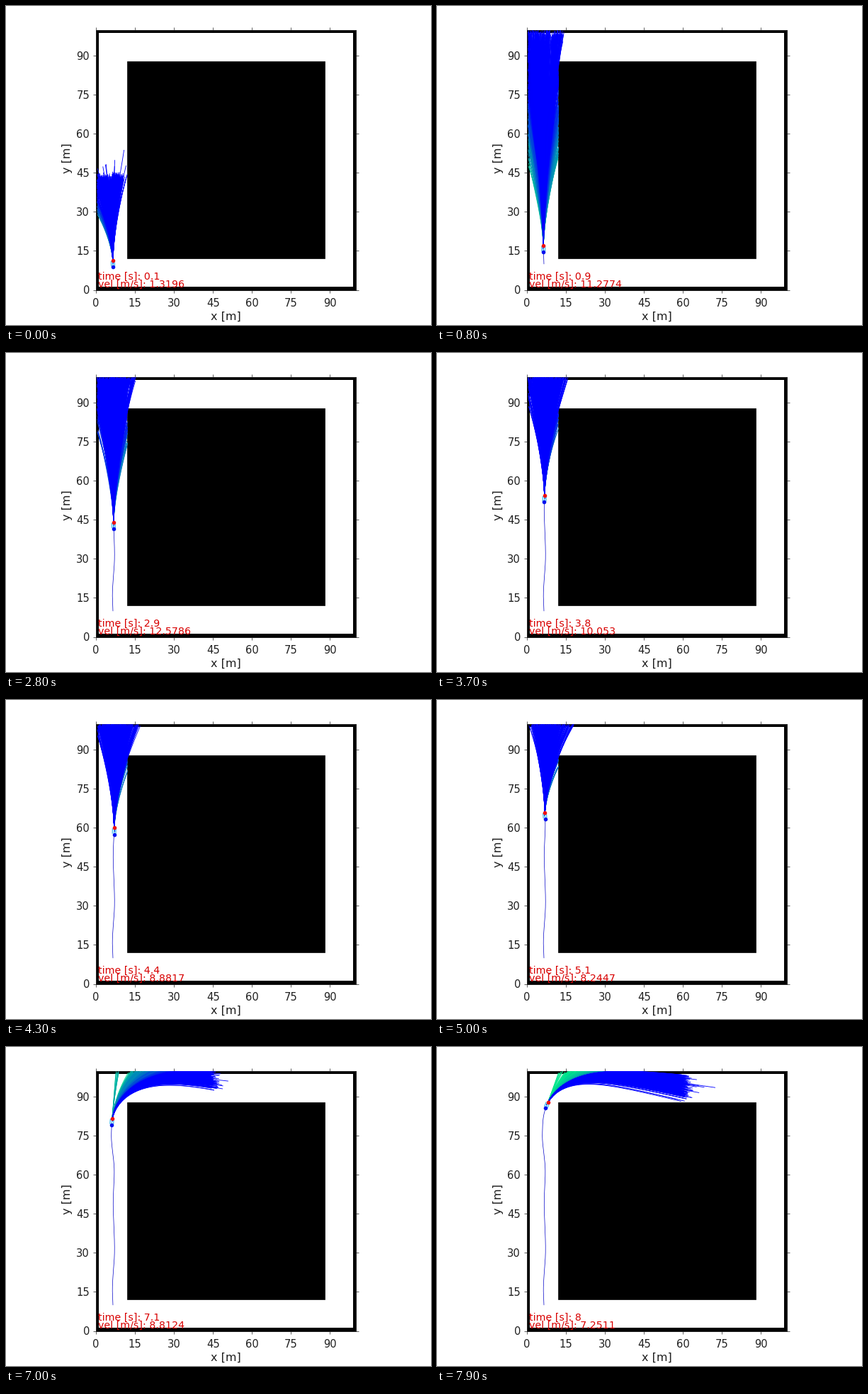
Recreate the animation shown at these times as a matplotlib script. Size 600 by 450 pixels, loop 8000 ms.

```python
import numpy as np
import matplotlib.pyplot as plt
from matplotlib.animation import FuncAnimation
from matplotlib.collections import LineCollection
from matplotlib.patches import Rectangle

W, H, DPI = 600, 450, 100
FRAMES, INTERVAL = 80, 100
PX = 72 / DPI                      # one pixel in points
LEFT, BOTTOM, SIDE = 127.125, 49.5, 366.75
INK = "0.12"
PLANS, STEPS = 600, 44
TURN_START = 6.4                   # seconds until the plans bend right

plt.rcParams.update({"font.family": "DejaVu Sans", "font.size": 14.3 * PX})


def hermite(x, xs, ys, slopes):
    """Cubic Hermite curve through the knots; returns value and slope."""
    k = np.clip(np.searchsorted(xs, x, side="right") - 1, 0, len(xs) - 2)
    h = xs[k + 1] - xs[k]
    u = (x - xs[k]) / h
    d = (ys[k + 1] - ys[k]) / h
    m0, m1 = slopes[k], slopes[k + 1]
    c2, c3 = 3 * d - 2 * m0 - m1, m0 + m1 - 2 * d
    value = ys[k] + h * u * (m0 + u * (c2 + u * c3))
    return value, m0 + u * (2 * c2 + 3 * u * c3)


# Key moments: time, y and speed
DRIVE = np.array([(0.1, 10.1, 1.3196), (0.9, 15.8, 11.2774),
                  (2.0, 30.7, 14.2992), (3.8, 53.1, 10.053),
                  (5.1, 64.7, 8.2447), (7.1, 80.5, 8.8124),
                  (8.0, 86.9, 7.2511)]).T

# Key points of the driven path
PATH_X, PATH_Y = np.array([(6.5, 10), (6.3, 15), (7.1, 30), (6.6, 50),
                           (7, 62), (5.9, 76), (6.65, 84), (8.4, 89)]).T
PATH_SLOPE = np.gradient(PATH_X, PATH_Y)


def path(y):
    return hermite(y, PATH_Y, PATH_X, PATH_SLOPE)


def straight_plans(rng, t, s):
    """Plans fanning out up the corridor, opening to the right with time."""
    a = np.clip(rng.normal(0, 0.38, (PLANS, 1)), -1, 1)
    left = 5.2 + 11 * np.exp(-3.5 * t)
    right = 5 + t ** 4 / 75
    wave = rng.normal(0, 0.2, (PLANS, 1)) * np.sin(s / 9) * s / 30
    return a * np.where(a < 0, left, right) * (s / 32.7) ** 1.7 + wave, s


def turning_plans(rng, t, s, heading):
    """Plans bending right around the corner."""
    q = rng.gamma(3, 0.22, (PLANS, 1))
    radius = (80 - 24 * (t - 7) + 45 * q) / 3.667
    end = np.radians(104 - 15 * np.minimum(q, 2))
    stray = rng.random((PLANS, 1)) < 0.015
    end = np.where(stray, heading + rng.uniform(-0.1, 0.25, q.shape), end)
    phi = heading + (end - heading) * np.tanh(s / radius)
    ds = np.diff(s, axis=1, prepend=0)
    return np.cumsum(np.sin(phi) * ds, axis=1), np.cumsum(np.cos(phi) * ds, axis=1)


def make_plans(i, x, y, heading):
    """Sampled plans cut at the walls, with their colours, costly ones first."""
    t = i * INTERVAL / 1000
    rng = np.random.default_rng(100 + i)
    turning = t >= TURN_START
    reach = 46.5 + 11.5 * (t - 7) if turning else min(33 + 62 * t, 88 - 6 * t)
    stretch = 1 + rng.normal(0, 0.025, (PLANS, 1))
    stretch += rng.exponential(0.06, (PLANS, 1)) * (rng.random((PLANS, 1)) < 0.05)
    s = reach * stretch * np.linspace(0, 1, STEPS)
    dx, dy = turning_plans(rng, t, s, heading) if turning else straight_plans(rng, t, s)
    px, py = x + dx, y + dy

    hit = (px < 0.4) | (py > 100) | ((px > 12.2) & (py < 88))
    count = np.where(hit.any(axis=1), hit.argmax(axis=1), STEPS)
    done = s[np.arange(PLANS), count - 1]
    cost = (0.77 - done / np.percentile(done, 98)) / 0.48
    cost = np.clip(cost + rng.normal(0, 0.08, PLANS), 0, 0.9)
    order = np.argsort(-cost)
    lines = [np.column_stack([px[k, :count[k]], py[k, :count[k]]])
             for k in order]
    c = cost[order]
    return lines, np.column_stack([0 * c, c, 1 - c / 2])


fig = plt.figure(figsize=(W / DPI, H / DPI), dpi=DPI, facecolor="white")
ax = fig.add_axes([LEFT / W, BOTTOM / H, SIDE / W, SIDE / H])
ax.set(xlim=(0, 100), ylim=(0, 100),
       xticks=range(0, 91, 15), yticks=range(0, 91, 15))
ax.tick_params(direction="out", top=True, right=True, length=4 * PX,
               width=0.7 * PX, color=INK, labelcolor=INK, labelsize=14.8 * PX)
ax.tick_params(axis="x", pad=7 * PX)
ax.tick_params(axis="y", pad=5 * PX)
for spine in ax.spines.values():
    spine.set(linewidth=0.7 * PX, color=INK)

# Outer wall, free track and inner block as nested squares
for inset, color, edge in [(0, "black", 0.7), (1.12, "white", 0), (12, "black", 0.7)]:
    size = 100 - 2 * inset
    ax.add_patch(Rectangle((inset, inset), size, size, facecolor=color,
                           edgecolor=color, linewidth=edge * PX, clip_on=False))

label = dict(ha="center", va="baseline", size=16 * PX, color=INK)
fig.text(310.5 / W, 7 / H, "x [m]", **label)
fig.text(91 / W, 235 / H, "y [m]", rotation=90, rotation_mode="anchor", **label)

plans = LineCollection([], linewidths=0.85 * PX, zorder=3)
body = LineCollection([], colors="#45bdf0", linewidths=1.3 * PX, zorder=5)
for lines in (plans, body):
    ax.add_collection(lines, autolim=False)
trail, = ax.plot([], [], color="#0000c8", lw=0.7 * PX, zorder=4)
dot = dict(marker="o", ls="", ms=5.6 * PX, mew=0, zorder=6)
rear, = ax.plot([], [], color="#0010f0", **dot)
front, = ax.plot([], [], color="#f01010", **dot)
time_text, speed_text = (
    fig.text(130.5 / W, y / H, "", color="#d80000", va="baseline", zorder=8)
    for y in (64.5, 53.5))


def update(i):
    t = (i + 1) / 10
    y, v = hermite(t, *DRIVE)
    x, slope = path(y)
    heading = np.arctan(slope)
    ahead = np.array([np.sin(heading), np.cos(heading)])
    side = np.array([ahead[1], -ahead[0]])
    pos = np.array([x, y])

    segments, colors = make_plans(i, x, y, heading)
    plans.set_segments(segments)
    plans.set_color(colors)

    ys = np.linspace(10, y, 150)
    trail.set_data(path(ys)[0], ys)
    body.set_segments([[pos + o * side - ahead, pos + o * side + ahead]
                       for o in (-0.65, 0, 0.65)])
    rear.set_data(*(pos - 1.25 * ahead)[:, None])
    front.set_data(*(pos + 1.25 * ahead)[:, None])
    time_text.set_text(f"time [s]: {t:g}")
    speed_text.set_text(f"vel [m/s]: {round(float(v), 4):g}")
    return plans, trail, body, rear, front, time_text, speed_text


anim = FuncAnimation(fig, update, frames=FRAMES, interval=INTERVAL,
                     repeat=True, repeat_delay=0, blit=False)
plt.show()
```
